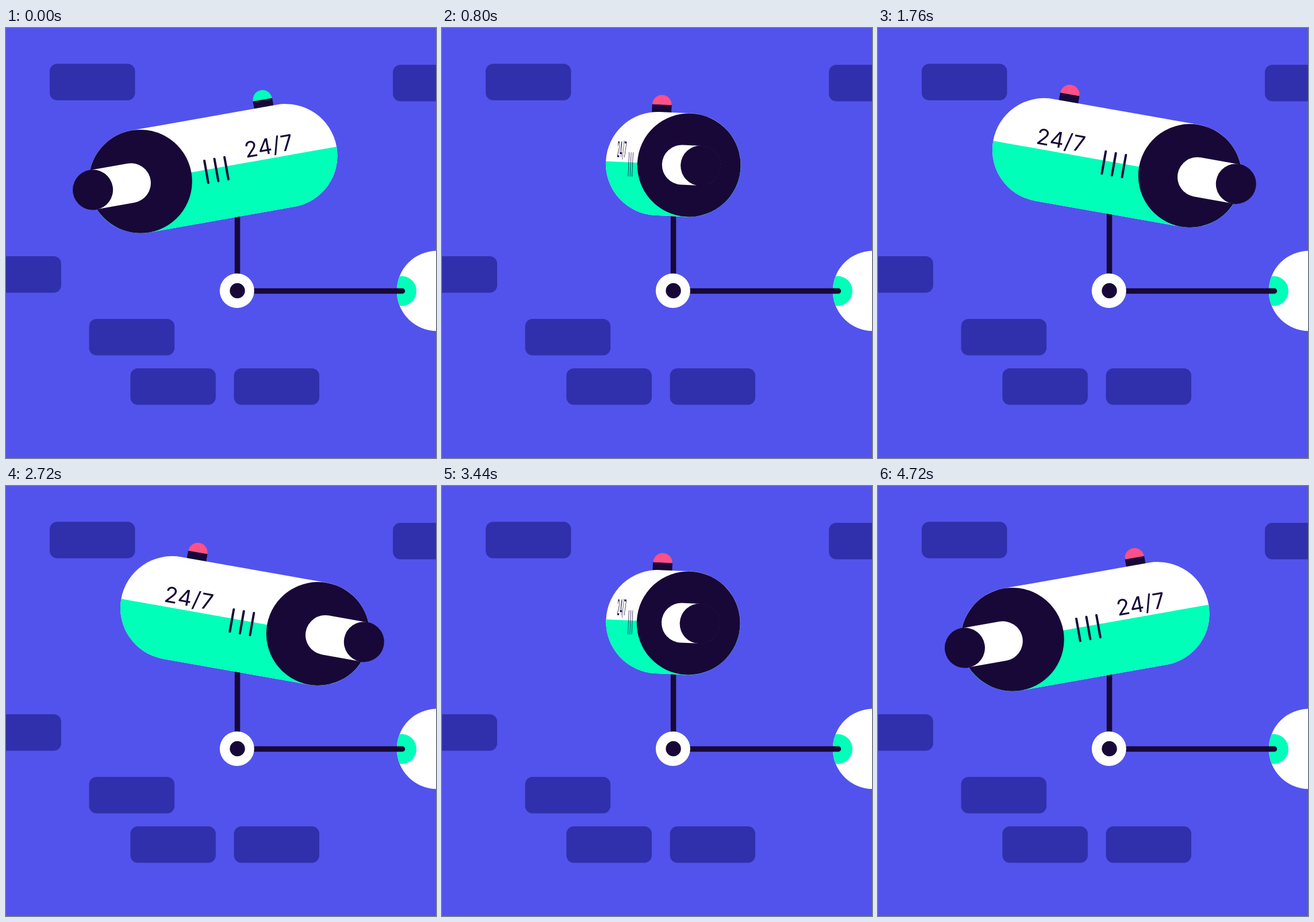
These frames come from a looping animation (748x748 px, 4800 ms). An HTML page:

```html
<!DOCTYPE html>
<html lang="en">
<head>
<meta charset="utf-8">
<title>Security camera</title>
<style>
  html, body { margin: 0; width: 100%; height: 100%; overflow: hidden; background: #5253ec; }
  svg { display: block; width: 100vw; height: 100vh; }
  text { font: 400 38px Inter, Roboto, sans-serif; letter-spacing: 1px; text-anchor: middle; }
</style>
</head>
<body>
<svg viewBox="0 0 748 748">
  <defs>
    <clipPath id="mount"><circle cx="749.5" cy="457.3" r="69.7"/></clipPath>
  </defs>
  <rect width="748" height="748" fill="#5253ec"/>
  <g id="bricks" fill="#3030ac"></g>

  <circle cx="749.5" cy="457.3" r="69.7" fill="#fff"/>
  <circle cx="688" cy="457.5" r="26" fill="#00ffb9" clip-path="url(#mount)"/>
  <path d="M402.5 240V457.5H689.5" fill="none" stroke="#180838" stroke-width="9.5" stroke-linecap="round"/>
  <circle cx="401.8" cy="457" r="30" fill="#fff"/>
  <circle cx="402.5" cy="457" r="13.2" fill="#180838"/>

  <g id="camera">
    <g id="light">
      <rect x="-17" y="-103" width="34" height="25" fill="#180838"/>
      <path id="bulb" d="M-16.7 -103a16.7 16.7 0 0 1 33.4 0z"/>
    </g>
    <path id="body" stroke="#fff" stroke-width="180" stroke-linecap="round"/>
    <path id="belly" fill="#00ffb9"/>
    <g id="label" fill="#180838"><text y="-8.2">24/7</text></g>
    <path id="vents" d="M-17.8 -16V23M0 -16V23M17.8 -16V23" stroke="#180838" stroke-width="4" stroke-linecap="round"/>
    <circle id="head" r="89.9" fill="#180838"/>
    <path id="tube" stroke="#fff" stroke-width="69" stroke-linecap="round"/>
    <circle id="lens" r="35" fill="#180838"/>
  </g>
</svg>
<script>
const LOOP = 4800, TURN = 1560, TO_RIGHT = -56, TO_LEFT = 2736, BLINK = 960;
const el = id => document.getElementById(id);
const set = (id, name, value) => el(id).setAttribute(name, value);
const mix = (a, b, k) => a + (b - a) * k;

for (const [x, y] of [[76, 62.2], [673, 64], [-52.5, 397], [144.6, 506], [216.4, 592], [396.5, 592]]) {
  const r = document.createElementNS('http://www.w3.org/2000/svg', 'rect');
  const box = { x, y, width: 148.5, height: 63.5, rx: 13 };
  for (const k in box) r.setAttribute(k, box[k]);
  el('bricks').append(r);
}

function ease(x) {
  x = Math.min(1, Math.max(0, x));
  return x < .5 ? 4 * x ** 3 : 1 - 4 * (1 - x) ** 3;
}

// Progress that lingers around the middle of the turn
function linger(u, a, b) {
  const w = 2 * u - 1;
  return .5 + .5 * w * (a + b * w ** 2 + (1 - a - b) * w ** 4);
}

function draw(t) {
  const u = ease((t - TO_RIGHT) / TURN) - ease((t - TO_LEFT) / TURN);
  const deg = 20.1 * (u - .5), rad = deg * Math.PI / 180;
  const cos = Math.cos(rad), sin = Math.sin(rad);

  const headX = mix(233.8, 542.7, u);
  const backX = mix(486.5, 289, linger(u, .43, .78));
  const baseX = mix(217.3, 555.5, linger(u, .65, .43));
  const lensX = mix(151, 622.8, u);
  const bulbX = mix(446.3, 333.7, t < 2400 ? linger(u, .44, .68) : linger(u, .36, .75));
  const cx = (headX + backX) / 2;
  const cy = 244.5 - 10 * u - 4 * u * (1 - u);
  const along = x => (x - cx) / cos;

  set('camera', 'transform', `translate(${cx} ${cy}) rotate(${deg})`);
  set('light', 'transform', `translate(${along(bulbX - 103 * sin)})`);
  set('bulb', 'fill', t % BLINK < BLINK / 2 ? '#00ffb9' : '#ff5088');

  const front = along(headX), h = Math.abs(front);
  set('body', 'd', `M${-h} 0H${h + .01}`);
  set('belly', 'd', `M${-h - 90} 0A90 90 0 0 0 ${-h} 90H${h}A90 90 0 0 0 ${h + 90} 0Z`);
  set('head', 'cx', front);
  set('tube', 'd', `M${along(baseX)} 0H${along(lensX) + .01}`);
  set('lens', 'cx', along(lensX));

  // Markings slide round the barrel and narrow as it faces forward
  const s = Math.min(1, h / 128.5), side = front > 0 ? -1 : 1;
  const sx = Math.max(.001, (s - .03) / .97);
  const place = x => `translate(${side * x}) scale(${sx} 1)`;
  set('label', 'transform', place(78.7 + 63.6 * s - 39.8 * s * s));
  set('vents', 'transform', place(77.8 - 2.4 * s - 70.4 * s * s));
}

function tick() {
  draw(performance.now() % LOOP);
  requestAnimationFrame(tick);
}
tick();
</script>
</body>
</html>
```
